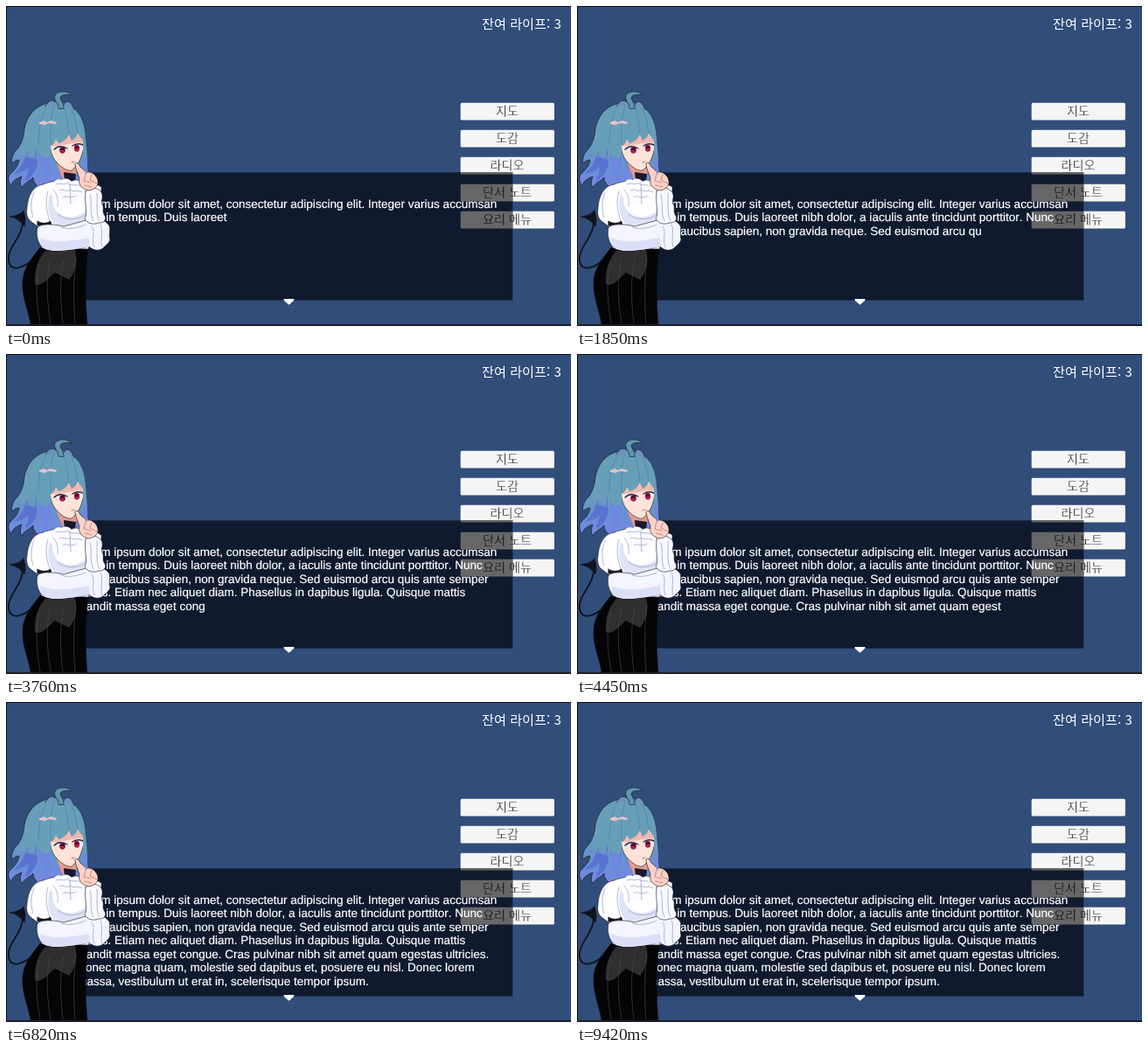
An HTML page that plays this animation: 646x366 px, repeating every 9.45 s.

```html
<!DOCTYPE html>
<html lang="ko">
<head>
<meta charset="utf-8">
<style>
html, body { margin: 0; width: 100%; height: 100%; overflow: hidden; background: #314d79; }
svg { display: block; width: 646px; height: 366px; }
.ko { font: 300 14.2px "Noto Sans CJK KR", "Noto Sans CJK", sans-serif; text-anchor: middle; stroke-width: .3; }
#lines { font: 13.53px "Liberation Sans", Arial, sans-serif; font-kerning: none; fill: #fff; stroke: #fff; stroke-width: .2; text-rendering: geometricPrecision; }
#girl { stroke: #14141e; stroke-width: .6; stroke-linejoin: round; stroke-linecap: round; }
.thin { fill: none; stroke: #9ba5cc; stroke-width: .8; }
.flat { stroke: none; }
</style>
</head>
<body>
<svg viewBox="0 0 646 366">
  <defs>
    <linearGradient id="hair" gradientUnits="userSpaceOnUse" x1="0" y1="150" x2="0" y2="206">
      <stop offset="0" stop-color="#689fb8"/>
      <stop offset=".5" stop-color="#6792cc"/>
      <stop offset="1" stop-color="#7288e6"/>
    </linearGradient>
    <clipPath id="shade"><rect x="67" y="190.3" width="512.3" height="146.3"/></clipPath>
  </defs>
  <rect width="646" height="366" fill="#314d79"/>
  <path d="M0 .5H646M.5 0V366" stroke="#0b111c"/>
  <rect y="364" width="646" height="2" fill="#1d1f24"/>
  <g id="buttons"></g>
  <rect x="67" y="190.3" width="512.3" height="146.3" fill="#0f1a2f"/>
  <g id="dimmed" clip-path="url(#shade)"></g>
  <text class="ko" x="635" y="25.5" style="font-size:15.2px;font-weight:400;fill:#fff;text-anchor:end">잔여 라이프: 3</text>
  <g id="lines"></g>
  <path d="M318.5 336h10l-5 4.5z" fill="#fff" stroke="#fff" stroke-width="2" stroke-linejoin="round"/>

  <g id="girl">
    <!-- tail -->
    <path d="M32 289C20 300 5 305 3 291C1 276 20 264 19 245" fill="none" stroke="#10121c" stroke-width="1.8"/>
    <path d="M20 234C22 240 23 246 21 252C17 246 11 242 4 241C11 240 17 238 20 234Z" fill="#10121c"/>
    <!-- back hair -->
    <path d="M58 110C36 110 24 124 21 141C20 152 17 160 10 167C7 171 6 176 7 180C10 177 12 176 15 176C14 184 9 188 4 193C2 197 3 202 6 206C7 200 12 197 18 195C16 200 16 204 18 208C21 202 26 201 31 196C31 201 34 205 38 207L95 202C98 198 94 188 92 180C90 170 91 162 90 150C89 128 80 110 58 110Z" fill="url(#hair)"/>
    <path d="M26 158C25 172 20 182 12 190M35 164C34 178 30 188 22 197" fill="none" stroke="#48689f" stroke-width=".7"/>
    <path class="flat" d="M22 172C19 182 14 188 8 192C15 191 22 189 26 184C25 191 24 196 22 200C31 195 36 187 36 176Z" fill="#5a73d2"/>
    <!-- skirt -->
    <path d="M42 272C34 284 20 296 19 316C18 334 26 348 28 364H93C91 340 90 316 94 276Z" fill="#040406"/>
    <path class="flat" d="M45 280C37 289 32 300 33 318C41 322 47 312 56 305L72 313C80 304 82 290 79 279Z" fill="#312e30"/>
    <path d="M38 296C33 316 35 342 39 363M51 290C45 310 47 340 51 363M66 290C61 312 62 340 65 363M80 288C77 312 77 340 79 363" fill="none" stroke="#4c4b50" stroke-width=".6"/>
    <!-- blouse -->
    <path d="M42 204C30 206 25 218 24 231C23 238 24 243 28 246L36 252C38 262 36 270 41 277L94 278L108 250L109 207C96 198 62 196 42 204Z" fill="#fff"/>
    <path class="flat" d="M50 215C46 229 49 244 57 251H93C103 240 107 228 103 217C94 235 70 236 50 215Z" fill="#dfe3f6"/>
    <path class="flat" d="M54 211C51 225 55 238 69 241C83 243 95 235 96 221C88 206 68 203 54 211Z" fill="#fff"/>
    <path class="thin" d="M48 212C44 225 47 236 50 246M32 213C28 223 28 233 31 242M59 238C67 245 81 246 91 239"/>
    <!-- neck, collar -->
    <path class="flat" d="M58 180L65 198L79 199L82 183Z" fill="#e69a90"/>
    <path class="flat" d="M66 190L80 192L79 201L67 200Z" fill="#171a2a"/>
    <g class="flat" fill="#fbfbff">
      <path d="M55 205C53 199 60 197 64 199C68 196 73 198 75 201C79 198 85 200 86 205C91 208 90 213 86 214C90 219 85 222 81 221C83 226 76 230 72 226C67 229 63 224 66 219C60 219 58 213 60 211C55 211 53 208 55 205Z"/>
    </g>
    <path class="thin" d="M57 204C61 201 66 206 70 202C74 207 80 203 85 206M61 211C66 208 69 214 74 210C78 214 82 209 87 213M65 219C69 215 73 222 80 217M73 203L74 226M54 210C58 214 60 221 59 229"/>
    <!-- arms -->
    <path d="M36 246C41 249 46 249 51 246L52 251C47 253 41 253 36 251Z" fill="#15161f"/>
    <path d="M36 253C40 249 53 249 66 252L99 243C106 241 114 246 118 251C120 257 117 262 119 267C118 272 114 273 111 277C105 281 99 279 95 275C76 279 53 283 43 277C36 272 34 261 36 253Z" fill="#f4f5ff"/>
    <path class="flat" d="M39 265C56 273 77 268 95 265L96 275C76 279 53 283 43 277C40 274 39 270 39 265Z" fill="#dbe0f8"/>
    <path d="M91 212C96 206 104 207 109 213C112 219 108 222 110 227C113 231 109 234 113 240C116 245 110 249 105 248C99 251 92 248 90 243C94 237 89 225 91 212Z" fill="#f8f9ff"/>
    <path class="thin" d="M96 216C99 226 95 237 100 246M104 214C105 225 102 237 107 246M98 252C103 259 97 267 101 276M108 250C112 258 107 267 110 276M63 253C72 256 82 254 91 250"/>
    <!-- face -->
    <path d="M50 145C49 161 51 172 59 180C65 186 71 189 75 188C82 183 89 172 90 150L82 135L58 135Z" fill="#fde3d8"/>
    <path class="flat" d="M50 148H90L89 157C78 154 62 162 51 160Z" fill="#f0bab0"/>
    <g class="flat">
      <path d="M58 162Q64 159 70 163L68 169Q63 170 60 168Z" fill="#fff"/>
      <ellipse cx="64.5" cy="165" rx="3.5" ry="3.8" fill="#b01f45"/>
      <path d="M62 162h5v3h-5z" fill="#4d1230"/>
      <path d="M76 160Q82 157 87 160L85 167Q81 168 78 167Z" fill="#fff"/>
      <ellipse cx="81" cy="162.8" rx="3.3" ry="4" fill="#b01f45"/>
      <path d="M79 160h4v3h-4z" fill="#4d1230"/>
    </g>
    <path d="M55 164Q61 158 70 163M76 160Q82 156 88 159" fill="none" stroke="#26264b" stroke-width="1.4"/>
    <path d="M75 179L78 178" fill="none" stroke="#b55e63" stroke-width=".9"/>
    <!-- hand -->
    <path d="M79 180C81 178 83 180 85 184L92 190C98 189 104 194 105 200C106 206 101 210 95 211C87 210 82 204 84 197L80 186Z" fill="#fbd3c6"/>
    <path d="M91 192L89 200L97 202M98 193L96 199L104 203M90 205L98 207" fill="none" stroke="#c9736f" stroke-width=".8"/>
    <!-- front hair -->
    <path class="flat" d="M58 111C37 111 27 126 25 143C25 154 21 163 16 169C25 169 32 164 35 158C35 174 38 190 46 201C52 192 52 176 51 160C54 159 56 156 57 152L60 157C66 156 70 151 72 147L75 154C79 152 81 149 82 146L88 154C88 170 88 180 91 192C95 184 92 167 91 152C90 128 80 111 58 111Z" fill="#689fb8"/>
    <path class="flat" d="M37 166C37 180 40 193 46 201C51 192 52 182 51 170C47 176 41 175 37 166ZM90 168C88 178 89 186 92 193C95 184 92 176 90 168Z" fill="#6d86e0"/>
    <path d="M45 118C38 131 37 146 37 158M55 114C50 128 51 142 51 158M66 114C69 124 71 136 72 147M75 119C79 127 81 136 82 146" fill="none" stroke="#4b7b9a" stroke-width=".6"/>
    <path class="flat" d="M38 133L43 131L47 133L51 131L58 133L57 135L49 134L44 136L38 135Z" fill="#e2c3c6"/>
    <!-- cowlick -->
    <path d="M60 117C59 110 54 107 56 102C59 97 69 96 75 102C70 101 63 101 62 105C63 109 66 111 66 117Z" fill="#5f96b0"/>
    <path d="M45 115C49 106 56 107 60 113M66 113C69 106 75 109 78 119" fill="#6d91bd"/>
  </g>
</svg>
<script>
const LOOP = 9450;
const TEXT = [
  "Lorem ipsum dolor sit amet, consectetur adipiscing elit. Integer varius accumsan",
  "nunc in tempus. Duis laoreet nibh dolor, a iaculis ante tincidunt porttitor. Nunc",
  "diam faucibus sapien, non gravida neque. Sed euismod arcu quis ante semper",
  "lectus. Etiam nec aliquet diam. Phasellus in dapibus ligula. Quisque mattis",
  "blandit massa eget congue. Cras pulvinar nibh sit amet quam egestas ultricies.",
  "Donec magna quam, molestie sed dapibus et, posuere eu nisl. Donec lorem",
  "massa, vestibulum ut erat in, scelerisque tempor ipsum."
];
const MENU = ["지도", "도감", "라디오", "단서 노트", "요리 메뉴"];
const $ = id => document.getElementById(id);

// a stroke in the button colour thins the letters
const menu = (fill, ink) => MENU.map((name, i) => {
  const y = 110.7 + 31 * i;
  return `<rect x="519.7" y="${y}" width="107.2" height="19.8" rx="1.5" fill="${fill}"/>
    <text class="ko" x="573" y="${y + 14.3}" fill="${ink}" stroke="${fill}">${name}</text>`;
}).join("");
$("buttons").innerHTML = menu("#f5f5f5", "#222");
$("dimmed").innerHTML = menu("#676767", "#0b0b0b");

$("lines").innerHTML = TEXT.map((_, i) => `<text x="81.2" y="${230.8 + 15.45 * i}"></text>`).join("");
const rows = [...$("lines").children];

function draw(now) {
  const t = now % LOOP;
  // 60 letters per second; the opening text holds briefly
  let left = t < 30 ? 109 : Math.floor(112.1 + 0.06 * t);
  TEXT.forEach((line, i) => {
    const shown = line.slice(0, Math.max(0, left));
    if (rows[i].textContent !== shown) rows[i].textContent = shown;
    left -= line.length + 1;
  });
  requestAnimationFrame(draw);
}
draw(0);
</script>
</body>
</html>
```
